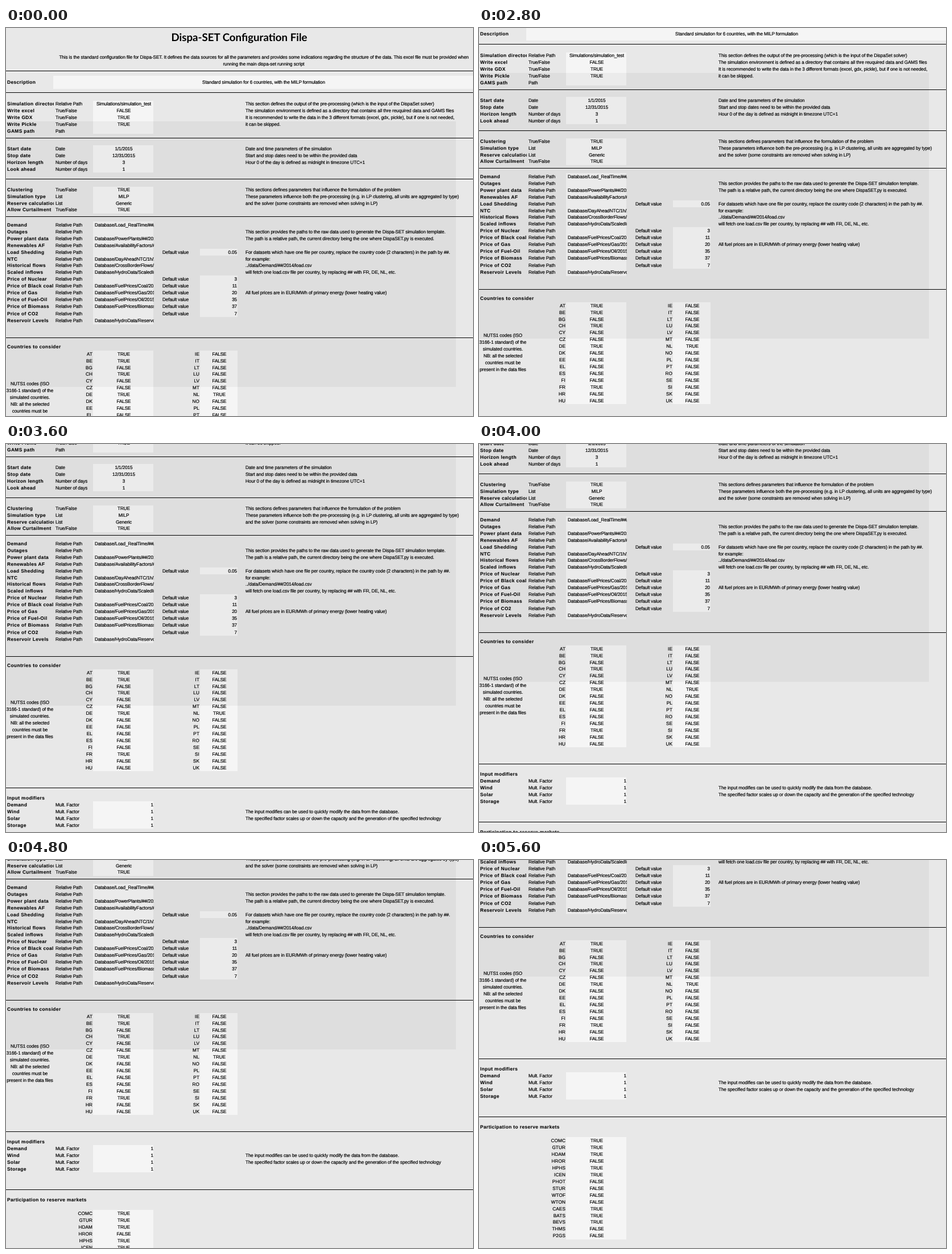
Write an HTML page that moves like this. It is 821 px wide and 682 px high and loops after 6 s.

```html
<!DOCTYPE html>
<html lang="en">
<head>
<meta charset="utf-8">
<title>Configuration file</title>
<style>
  html, body { margin: 0; width: 100%; height: 100%; overflow: hidden; background: #e8e8e8; }
  svg { display: block; width: 821px; height: 682px; overflow: hidden; }
  text {
    font: 8.2px "Liberation Sans", Arial, sans-serif;
    letter-spacing: -.12px;
    text-rendering: geometricPrecision;
    white-space: pre;
    fill: #000; stroke: #000; stroke-width: .2px;
  }
  .bold { font-size: 8.4px; font-weight: 700; letter-spacing: .38px; stroke-width: .1px; }
  .code { letter-spacing: .1px; }
  .title { font: 700 18.7px Lato, "Open Sans", sans-serif; letter-spacing: 0; stroke: none; }
  .mid { text-anchor: middle; }
  .end { text-anchor: end; }
  #sheet { animation: scroll 6s step-end infinite; }
  @keyframes scroll {
    0% { transform: translateY(0); }
    40% { transform: translateY(-43px); }
    46.6666% { transform: translateY(-85px); }
    53.3333% { transform: translateY(-128px); }
    60% { transform: translateY(-171px); }
    66.6666% { transform: translateY(-213px); }
    73.3333% { transform: translateY(-256px); }
    80% { transform: translateY(-298px); }
    86.6666% { transform: translateY(-341px); }
    93.3333%, 100% { transform: translateY(-426px); }
  }
</style>
</head>
<body>
<svg viewBox="0 0 821 682">
  <defs>
    <clipPath id="colA"><rect width="84" height="1110"/></clipPath>
    <clipPath id="colC"><rect x="153" width="107" height="1110"/></clipPath>
  </defs>
  <g id="sheet">
    <g id="cells"></g>
    <rect x="1" y="164" width="790" height="467" fill="#000" fill-opacity=".04"/>
    <g id="rules"></g>
    <g id="labels" clip-path="url(#colA)"></g>
    <g id="values" clip-path="url(#colC)"></g>
    <g id="texts"></g>
  </g>
</svg>
<script>
const NS = 'http://www.w3.org/2000/svg';
const layer = id => document.getElementById(id);

function add(id, tag, attrs, content) {
  const el = document.createElementNS(NS, tag);
  for (const k in attrs) el.setAttribute(k, attrs[k]);
  if (content !== undefined) el.textContent = content;
  layer(id).appendChild(el);
}

// y is the middle of the row
const put = (id, x, y, content, cls = '') =>
  add(id, 'text', { x, y: Math.round(y + 2.9), class: cls }, content);
const cell = (x, y, right, bottom) =>
  add('cells', 'rect', { x, y, width: right - x, height: bottom - y, fill: '#f5f5f5' });

cell(83, 84, 821, 107);
[[128, 186], [206, 254], [279, 326], [340, 521], [567, 746], [799, 847], [913, 1093]]
  .forEach(([top, bottom]) => cell(153, top, 259, bottom));
[[388, 400], [435, 508], [567, 746]].forEach(([top, bottom]) => cell(341, top, 407, bottom));

[75, 113, 193, 265, 331, 544, 775, 877].forEach(y =>
  add('rules', 'rect', { x: 0, y, width: 821, height: 1 }));

add('texts', 'text', { x: 410, y: 23, class: 'title mid' }, 'Dispa-SET Configuration File');
put('texts', 453.5, 51.5, 'This is the standard configuration file for Dispa-SET. It defines the data sources for all the parameters and provides some indications regarding the structure of the data. This excel file must be provided when', 'mid');
put('texts', 453, 63.5, 'running the main dispa-set running script', 'mid');
put('texts', 453, 95.5, 'Standard simulation for 6 countries, with the MILP formulation', 'mid');
[[95.5, 'Description'], [560.5, 'Countries to consider'], [793, 'Input modifiers'],
 [895.5, 'Participation to reserve markets']].forEach(([y, s]) => put('texts', 2, y, s, 'bold'));

const REL = 'Relative Path', BOOL = 'True/False', DAYS = 'Number of days', MULT = 'Mult. Factor';

// y, label, kind, centred value, note
const settings = [
  [133.5, 'Simulation directory', REL, 'Simulations/simulation_test', 'This section defines the output of the pre-processing (which is the input of the DispaSet solver)'],
  [145.5, 'Write excel', BOOL, 'FALSE', 'The simulation environment is defined as a directory that contains all thre reuquired data and GAMS files'],
  [157.5, 'Write GDX', BOOL, 'TRUE', 'It is recommended to write the data in the 3 different formats (excel, gdx, pickle), but if one is not needed,'],
  [169.5, 'Write Pickle', BOOL, 'TRUE', 'it can be skipped.'],
  [181, 'GAMS path', 'Path'],
  [212, 'Start date', 'Date', '1/1/2015', 'Date and time parameters of the simulation'],
  [224, 'Stop date', 'Date', '12/31/2015', 'Start and stop dates need to be within the provided data'],
  [236, 'Horizon length', DAYS, '3', 'Hour 0 of the day is defined as midnight in timezone UTC+1'],
  [248, 'Look ahead', DAYS, '1'],
  [284.5, 'Clustering', BOOL, 'TRUE', 'This sections defines parameters that influence the formulation of the problem'],
  [296.5, 'Simulation type', 'List', 'MILP', 'These parameters influence both the pre-processing (e.g. in LP clustering, all units are aggregated by type)'],
  [308.5, 'Reserve calculation', 'List', 'Generic', 'and the solver (some constraints are removed when solving in LP)'],
  [319.5, 'Allow Curtailment', BOOL, 'TRUE']
];

// y, label, path, default, note
const paths = [
  [346, 'Demand', 'Load_RealTime/##/2015'],
  [358, 'Outages', '', '', 'This section provides the paths to the raw data used to generate the Dispa-SET simulation template.'],
  [370, 'Power plant data', 'PowerPlants/##/2015', '', 'The path is a relative path, the current directory being the one where DispaSET.py is executed.'],
  [382, 'Renewables AF', 'AvailabilityFactors/##'],
  [394, 'Load Shedding', '', '0.05', 'For datasets which have one file per country, replace the country code (2 characters) in the path by ##.'],
  [406, 'NTC', 'DayAheadNTC/1h/2015', '', 'for example:'],
  [417.5, 'Historical flows', 'CrossBorderFlows/1h', '', '../data/Demand/##/2014/load.csv'],
  [429.5, 'Scaled inflows', 'HydroData/ScaledInflows', '', 'will fetch one load.csv file per country, by replacing ## with FR, DE, NL, etc.'],
  [441.5, 'Price of Nuclear', '', '3'],
  [453.5, 'Price of Black coal', 'FuelPrices/Coal/2015', '11'],
  [465.5, 'Price of Gas', 'FuelPrices/Gas/2015', '20', 'All fuel prices are in EUR/MWh of primary energy (lower heating value)'],
  [477.5, 'Price of Fuel-Oil', 'FuelPrices/Oil/2015', '35'],
  [489.5, 'Price of Biomass', 'FuelPrices/Biomass/2015', '37'],
  [502, 'Price of CO2', '', '7'],
  [514.5, 'Reservoir Levels', 'HydroData/ReservoirLevel']
];

const modifiers = [
  [805.5, 'Demand'],
  [817.5, 'Wind', 'The input modifies can be used to quickly modify the data from the database.'],
  [829.5, 'Solar', 'The specified factor scales up or down the capacity and the generation of the specified technology'],
  [841.5, 'Storage']
];

function head(y, label, kind, note) {
  put('labels', 2, y, label, 'bold');
  put('texts', 87, y, kind);
  if (note) put('texts', 421, y, note);
}

settings.forEach(([y, label, kind, value, note]) => {
  head(y, label, kind, note);
  if (value) put('values', 207, y, value, 'mid');
});
paths.forEach(([y, label, path, number, note]) => {
  head(y, label, REL, note);
  if (path) put('values', 156, y, 'Database/' + path);
  if (number) {
    put('texts', 275, y, 'Default value');
    put('texts', 406, y, number, 'end');
  }
});
modifiers.forEach(([y, label, note]) => {
  head(y, label, MULT, note);
  put('values', 259, y, '1', 'end');
});

// codes marked with * are switched on
function flags(codes, top, codeX, valueX) {
  codes.split(' ').forEach((code, i) => {
    const y = top + i * 11.93;
    put('texts', codeX, y, code.replace('*', ''), 'code end');
    put('texts', valueX, y, code.endsWith('*') ? 'TRUE' : 'FALSE', 'mid');
  });
}
flags('AT* BE* BG CH* CY CZ DE* DK EE EL ES FI FR* HR HU', 572.8, 152, 207);
flags('IE IT LT LU LV MT NL* NO PL PT RO SE SI SK UK', 572.8, 340, 375);
flags('COMC* GTUR* HDAM* HROR HPHS* ICEN* PHOT STUR WTOF WTON CAES* BATS* BEVS* THMS P2GS', 919.4, 152, 207);

['NUTS1 codes (ISO', '3166-1 standard) of the', 'simulated countries.', 'NB: all the selected',
 'countries must be', 'present in the data files'].forEach((s, i) => put('texts', 42, 625.4 + i * 12, s, 'mid'));
</script>
</body>
</html>
```
